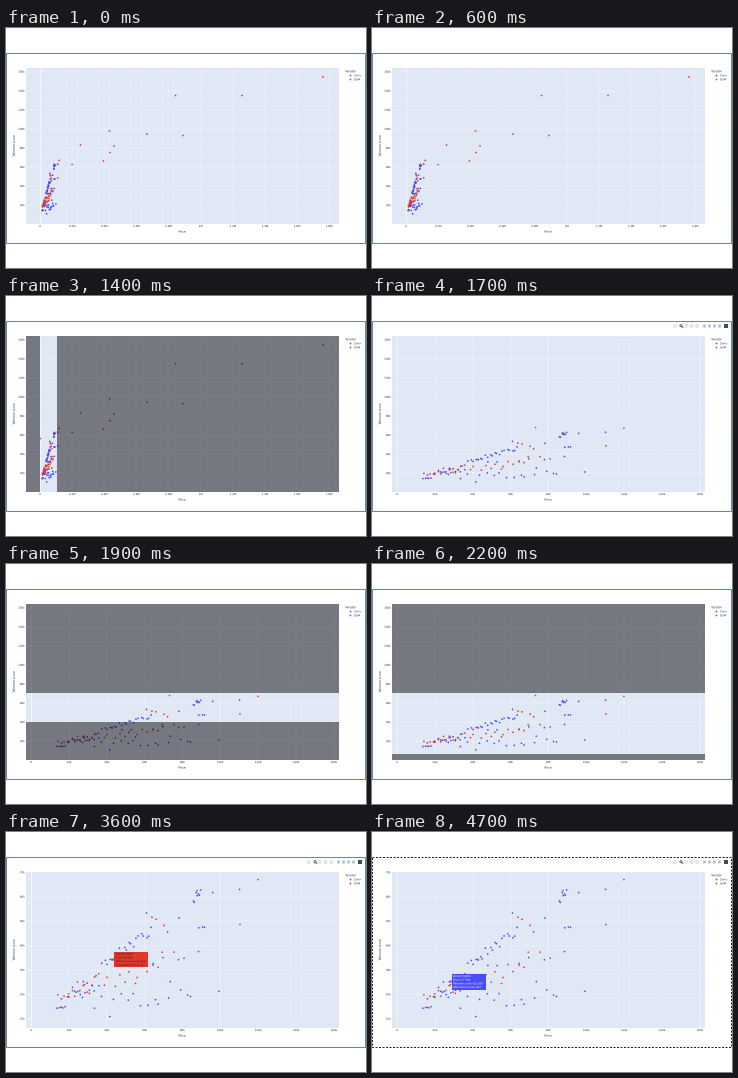
A matplotlib script for the animation above (4.8 s loop, 360x240 px).

```python
import matplotlib.pyplot as plt
import numpy as np
from matplotlib.animation import FuncAnimation
from matplotlib.patches import Circle, PathPatch, Polygon, Rectangle
from matplotlib.textpath import TextPath
from matplotlib.transforms import Affine2D

W, H, DPI = 360, 240, 100
FRAMES, STEP = 48, 100
PT = 72 / DPI
LEFT, RIGHT, TOP, BOTTOM = 19.5, 333, 40, 196
RED, BLUE, INK = "#e0392c", "#4a4cf6", "#262b33"
PANEL, FRAME, ICON, DARK = "#e0e7f5", "#6288a0", "#b9bec8", "#444a54"

plt.rcParams["font.family"] = "DejaVu Sans"
fig = plt.figure(figsize=(W / DPI, H / DPI), dpi=DPI, facecolor="white")
ax = fig.add_axes([0, 0, 1, 1])
rng = np.random.default_rng(7)


class Scale:
    """Linear map from thousands to pixels, with its ticks."""

    def __init__(self, zero, slope, ticks):
        self.zero, self.slope, self.ticks = zero, slope, ticks

    def __call__(self, value):
        return self.zero + self.slope * np.asarray(value)


x_wide = Scale(34, 0.1606, range(0, 1801, 200))
x_zoom = Scale(25, 1.8925, range(0, 161, 20))
y_wide = Scale(196.2, -0.953, range(20, 161, 20))
y_zoom = Scale(211.1, -2.44, range(10, 71, 10))


def cloud(n, start, end, spread):
    """Chips strewn around the trend line from start to end (price, score)."""
    t = (np.arange(n) + rng.uniform(0.1, 0.9, n)) / n
    trend = np.outer(1 - t, start) + np.outer(t, end)
    trend[:, 1] += rng.uniform(-spread, spread, n)
    return trend


TOP_RED, MID_RED, LOW_BLUE = (119.9, 67.0), (42.8, 34.3), (27.7, 25.2)

blue = np.vstack([
    cloud(20, (13, 16), (36, 26), 3.5),
    cloud(21, (37, 32), (64, 46), 2),
    cloud(7, (85.5, 59), (90, 62), 2),
    cloud(3, (88.5, 47.4), (93, 47.4), 0.2),
    cloud(16, (32, 15), (87, 22), 5.5),
    cloud(6, (41, 30), (90, 36), 2),
    [LOW_BLUE, (61, 53.3), (78.2, 51.3), (96, 61.7), (110.2, 63), (99.3, 21.2)],
])
red = np.vstack([
    cloud(16, (14, 17), (36, 26), 4),
    cloud(12, (37, 26), (69, 30), 4),
    cloud(4, (62, 52), (75, 45), 1),
    cloud(3, (67, 37), (86, 35), 2),
    [MID_RED, TOP_RED, (110.4, 48.6), (87.7, 62.5)],
    # servers, far beyond the desktop price range
    [(200, 62.6), (252, 83), (395, 66.3), (433, 98), (436, 75.2), (461, 82),
     (666, 94.5), (844, 135), (890, 93), (1258, 135), (1762, 154.5)],
])

# first frame, last frame, chip, card width, colour, ink, vendor, model
HOVERS = [
    (25, 31, TOP_RED, 36, RED, "#3a1512", "QVM", "QVM Hexon 7742"),
    (34, 40, MID_RED, 34, RED, "#3a1512", "QVM", "QVM Rivon 5 11"),
    (43, 47, LOW_BLUE, 34.5, BLUE, "white", "Zorix", "Zorix Lumo 104"),
]


def text(x, y, s, size=2.7, color=INK, align=0.5, angle=0, z=4):
    """Text as outlines, so that tiny glyphs keep their true spacing."""
    path = TextPath((0, 0), s, size=size)
    shift = Affine2D().translate(-align * path.get_extents().x1, -0.36 * size)
    place = shift.scale(1, -1).rotate_deg(-angle).translate(x, y)
    ax.add_patch(PathPatch(place.transform_path(path), fc=color, lw=0, zorder=z))


def box(x0, y0, x1, y1, color, **kw):
    ax.add_patch(Rectangle((x0, y0), x1 - x0, y1 - y0, fc=color, lw=0, **kw))


def line(xs, ys, color, width):
    ax.plot(xs, ys, color=color, lw=width * PT)


def dots(x, y, color, size=1.7):
    x, y = np.atleast_1d(x), np.atleast_1d(y)
    # one size per dot keeps sub-pixel positions
    ax.scatter(x, y, s=np.full(x.size, (size * PT) ** 2), c=color, lw=0, zorder=3)


def tick_label(k):
    if k == 0:
        return "0"
    return f"{k / 1000:g}M" if k >= 200 else f"{k}k"


def draw_chart(sx, sy):
    box(LEFT, TOP, RIGHT, BOTTOM, PANEL)
    for k in sx.ticks:
        line([sx(k)] * 2, [TOP, BOTTOM], "white", 0.6 if k == 0 else 0.35)
        text(sx(k), 198.1, tick_label(k))
    for k in sy.ticks:
        line([LEFT, RIGHT], [sy(k)] * 2, "white", 0.35)
        text(18.8, sy(k), tick_label(k), align=1)
    for chips, color in ((blue, BLUE), (red, RED)):
        px, py = sx(chips[:, 0]), sy(chips[:, 1])
        seen = (px < RIGHT) & (py > TOP) & (py < BOTTOM)
        dots(px[seen], py[seen], color)
    text(176, 203.6, "Price", 3)
    text(7.8, 118, "Tallmere score", 3, angle=90)


def draw_legend():
    text(339.3, 43.2, "Vendor", 3, align=0)
    for y, name, color in ((47.4, "Zorix", BLUE), (51.4, "QVM", RED)):
        dots(344, y, color)
        text(348, y, name, align=0)


def draw_modebar(y=30):
    for k in range(5):
        x = 303 + 5.5 * k
        if k == 1:
            ax.add_patch(Circle((x + 0.5, y - 0.3), 1.1, fill=False, ec=DARK, lw=0.8 * PT))
            line([x + 1.3, x + 2.4], [y + 0.5, y + 1.8], DARK, 0.8)
        else:
            ax.add_patch(Circle((x, y), 1.3, fill=False, ec=ICON, lw=0.6 * PT))
    for k in range(4):
        x = 332.5 + 5 * k
        box(x - 1.4, y - 1.4, x + 1.4, y + 1.4, ICON, snap=False)
    box(352, y - 2, 356, y + 2, DARK)


def draw_hover(chip, width, color, ink, vendor, model):
    x, y = x_zoom(chip[0]), y_zoom(chip[1])
    x0 = x + 2.1
    box(x0, max(y - 7.9, TOP), x0 + width, y + 8, color, zorder=6)
    ax.add_patch(Polygon([(x, y), (x0 + 0.1, y - 1.8), (x0 + 0.1, y + 1.8)],
                         fc=color, lw=0, zorder=6))
    rows = (f"Vendor={vendor}", f"Price={chip[0]:.2f}k",
            f"Tallmere score={chip[1] * 1000:,.0f}", f"CPU={model}")
    for i, row in enumerate(rows):
        text(x0 + 1.3, y - 5.6 + 3.7 * i, row, 2.6, ink, align=0, z=7)


def shade(x0, y0, x1, y1):
    box(x0, y0, x1, y1, "black", alpha=0.48, zorder=5)


def draw_frame(i):
    ax.cla()
    ax.set(xlim=(0, W), ylim=(H, 0))
    ax.axis("off")

    dragging_x, dragging_y = 13 <= i < 16, 18 <= i < 23
    draw_chart(x_zoom if i >= 16 else x_wide, y_zoom if i >= 23 else y_wide)
    draw_legend()
    if i >= 9 and not (dragging_x or dragging_y):
        draw_modebar()

    # pointer where each drag begins
    if 12 <= i < 16:
        dots(34, 142.3, "#b0605e")
    elif 17 <= i < 23:
        dots(163, 131, "#c05a54")
    if dragging_x:
        shade(LEFT, TOP, 33.5, BOTTOM)
        shade(33.5 + 8.9 * (i - 12), TOP, RIGHT, BOTTOM)
    if dragging_y:
        shade(LEFT, TOP, RIGHT, 129.3)
        shade(LEFT, min(129.3 + 14.4 * (i - 17), 190.3), RIGHT, BOTTOM)
    for first, last, *hover in HOVERS:
        if first <= i <= last:
            draw_hover(*hover)

    closing = i == FRAMES - 1
    ax.add_patch(Rectangle((0, 25), W - 1, 190, fill=False, lw=PT, snap=True,
                           ec="#222222" if closing else FRAME,
                           ls=(0, (2, 1.5)) if closing else "-"))
    return []


anim = FuncAnimation(fig, draw_frame, frames=FRAMES, init_func=lambda: [],
                     interval=STEP, repeat=True, repeat_delay=0, blit=False)
plt.show()
```
